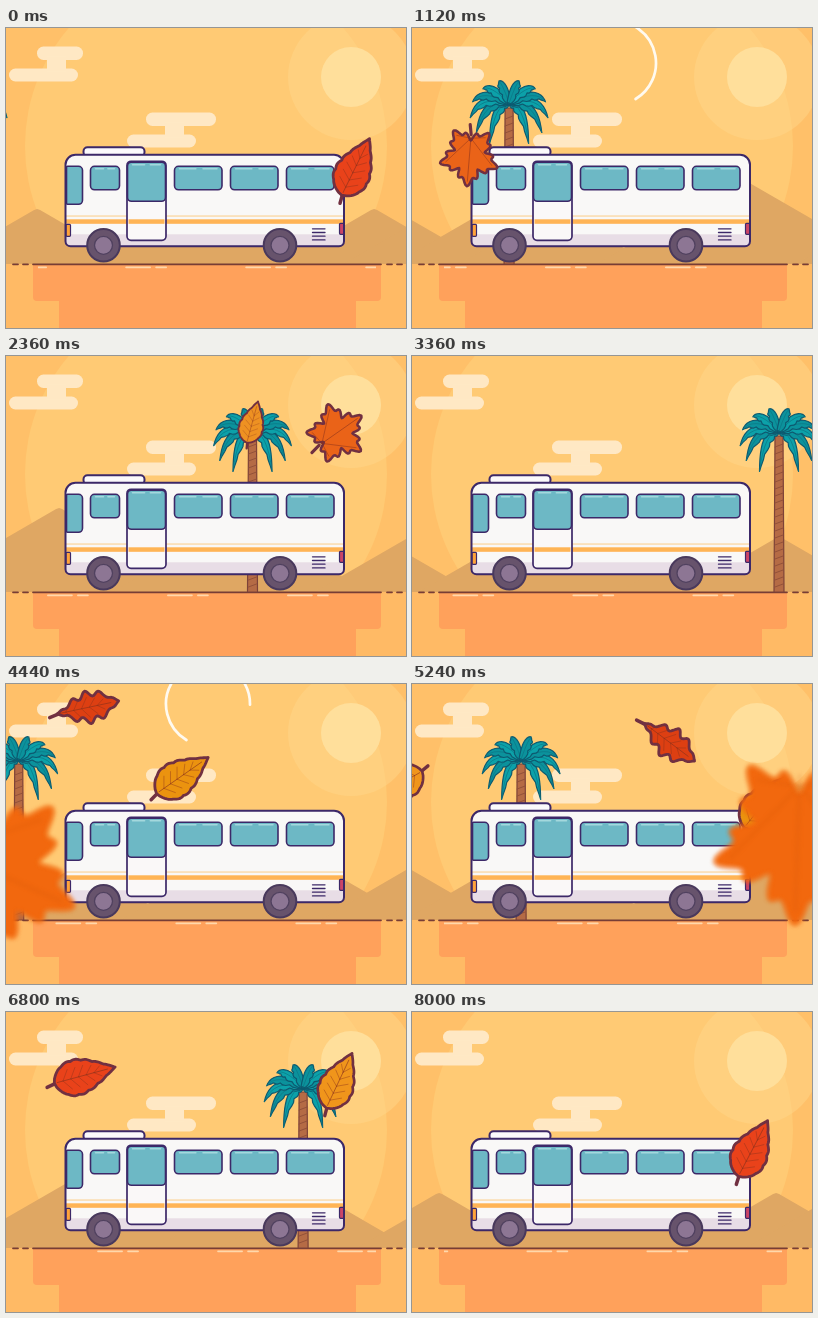
An HTML page with a canvas for the animation above (8.04 s loop, 400 px wide and 300 px high).

```html
<!DOCTYPE html>
<html lang="en">
<head>
<meta charset="utf-8">
<title>Autumn bus trip</title>
<style>
html, body { margin: 0; width: 100%; height: 100%; overflow: hidden; background: #ffc069; }
canvas { display: block; width: 400px; height: 300px; }
</style>
</head>
<body>
<canvas id="stage" width="400" height="300"></canvas>
<script>
const c = document.getElementById('stage').getContext('2d');
const LOOP = 8040, LAP = LOOP / 2, INK = '#3c2868', GLASS = '#6db8c5';
const { PI, sin, cos, abs, min, max } = Math;
const rad = a => a * PI / 180;
const mix = (a, b, p) => a + (b - a) * p;
const range = (n, fn) => Array.from({ length: n }, (_, i) => fn(i));
// Time passed since a moment, wrapped around the loop
const since = (t, at) => (t - at + LOOP) % LOOP;

function paint(fill, stroke, width = 2) {
  if (fill) { c.fillStyle = fill; c.fill(); }
  if (stroke) { c.strokeStyle = stroke; c.lineWidth = width; c.stroke(); }
}
function disc(x, y, r, fill, stroke, width) {
  c.beginPath(); c.arc(x, y, r, 0, 7); paint(fill, stroke, width);
}
function box(x, y, w, h, r, fill, stroke, width) {
  c.beginPath(); c.roundRect(x, y, w, h, r); paint(fill, stroke, width);
}
function line(x1, y1, x2, y2, color, width) {
  c.beginPath(); c.moveTo(x1, y1); c.lineTo(x2, y2); paint(null, color, width);
}
function poly(points, fill, stroke, width) {
  c.beginPath(); points.forEach(p => c.lineTo(...p)); c.closePath();
  paint(fill, stroke, width);
}

function cloud(x, y, top, width) {
  const color = '#ffe8c4';
  box(x + top, y, width, 13.5, 6.5, color);
  box(x, y + 22, 69, 13, 6.5, color);
  box(x + 38, y + 10, 19, 15, 0, color);
}
function sky() {
  c.fillStyle = '#ffc069'; c.fillRect(0, 0, 400, 300);
  disc(200, 118, 181, '#ffca74');
  disc(345, 49, 63, 'rgba(255,216,140,.45)');
  disc(345, 49, 30, '#ffdf9b');
  cloud(3, 18.5, 28, 46);
  cloud(121, 84.5, 19, 70);
}

// A stroke that sweeps clockwise around a ring and is erased behind its head
function gust(t, at, y) {
  const head = since(t, at) - 100;
  const from = max(-100, head - 240), to = min(400, head);
  if (from >= to) return;
  c.beginPath(); c.arc(202, y, 42, rad(from), rad(to)); paint(null, '#fffaf0', 2.7);
}

function hill(x, h) {
  const w = h * 1.75;
  poly([[x - w, 236], [x - 3, 237 - h], [x, 236 - h], [x + 3, 237 - h], [x + w, 236]], '#dfa763');
}
function hills(t) {
  const lap = 402, shift = t % LAP / LAP * lap;
  for (let k = -2; k < 2; k++) {
    hill(31 + shift + k * lap, 55);
    hill(219 + shift + k * lap, 84);
    hill(368 + shift + k * lap, 55);
  }
}

function frond(angle, color) {
  const tx = 39 * cos(angle), ty = 34 * sin(angle) + 11;
  const cx = tx * .75, cy = ty * .35 - 14, side = tx < 0 ? -1 : 1;
  const edge = (i, reach) => {
    const u = i / 12, w = reach * sin(PI * (u * .8 + .2)) * side;
    const dx = mix(cx, tx - cx, u), dy = mix(cy, ty - cy, u), n = Math.hypot(dx, dy);
    return [2 * u * (1 - u) * cx + u * u * tx + dy / n * w,
            2 * u * (1 - u) * cy + u * u * ty - dx / n * w];
  };
  poly([...range(13, i => edge(i, 3.6)), ...range(13, i => edge(12 - i, i % 3 ? -5.2 : -3.6))],
    color, '#0d5a70', 1.2);
  c.beginPath(); c.moveTo(0, 0); c.quadraticCurveTo(cx, cy, tx, ty); paint(null, '#0c7685', .7);
}
function palm(t) {
  c.save();
  c.translate(-38 + t % LAP * .1205, 75);
  poly([[-4, 5], [4, 5], [5, 161], [-5, 161]], '#b56b45', '#7d4238', 1.2);
  for (let y = 16; y < 158; y += 7) line(-4, y, 4, y - 3, '#8f4f38', .9);
  // From the drooping fronds up to the crown
  for (let i = 0; i < 6; i++)
    for (const s of [-1, 1]) frond(rad(-90 + s * (150 - i * 27)), i % 2 ? '#0b929c' : '#0ca1a9');
  c.restore();
}

function ground(t) {
  c.fillStyle = '#ffba65'; c.fillRect(0, 236, 400, 64);
  box(27, 236, 348, 37, [0, 0, 4, 4], '#ffa15b');
  c.fillRect(53, 270, 297, 30);
  c.save();
  c.beginPath(); c.rect(32, 237, 338, 5); c.clip();
  for (let x = t * 120 / 1005 % 120 - 120; x < 400; x += 120) {
    line(x, 239.3, x + 24, 239.3, '#ffd8ab', 1.8);
    line(x + 30, 239.3, x + 40, 239.3, '#ffd8ab', 1.8);
  }
  c.restore();
  line(27, 236.3, 375, 236.3, '#773d35', 1.8);
  for (const x of [7, 17, 381, 391]) line(x, 236.3, x + 5, 236.3, '#773d35', 1.8);
}

function pane(x, y, w, h) {
  box(x, y, w, h, 4, GLASS, INK, 1.6);
  line(x + 5, y + 2.5, x + w * .45, y + 2.5, '#a4d8dd', 1.5);
  line(x + w * .6, y + 2.5, x + w - 5, y + 2.5, '#a4d8dd', 1.5);
}
function bus() {
  const hull = (fill, stroke) => box(60, 127.5, 278.5, 91.5, [10, 10, 5, 5], fill, stroke);
  c.save();
  c.translate(-.5, -.7);
  box(78, 120, 61, 9, 4, '#fbf9fb', INK);
  hull('#f9f8f7');
  c.save(); c.clip();
  c.fillStyle = '#e8dde6'; c.fillRect(60, 207, 280, 13);
  c.fillStyle = '#fbdcae'; c.fillRect(60, 188, 280, 1.5);
  c.fillStyle = '#ffb455'; c.fillRect(60, 192, 280, 4.5);
  c.restore();
  box(61, 139, 16, 38, [1, 4, 4, 1], GLASS, INK, 1.6);
  pane(85, 139, 29, 23.5);
  for (let i = 0; i < 3; i++) pane(169 + i * 56, 139, 47.5, 23.5);
  box(121.5, 134, 39, 79, 4, '#faf8f8', INK, 1.7);
  c.fillStyle = '#ffb455'; c.fillRect(123, 192, 36, 4.5);
  pane(122, 135, 38, 39);
  box(60.5, 197, 4.5, 12, 1, '#ffa33a', INK, 1.2);
  box(334, 196, 4.5, 11, 1, '#cb4467', INK, 1.2);
  for (let y = 201.5; y < 215; y += 3.7) line(307, y, 319.5, y, INK, 1.3);
  hull(null, INK);
  for (const x of [98, 274.5]) {
    disc(x, 218, 16.3, '#67536c', '#49395c');
    disc(x, 218, 9, '#8d7694', '#50415f', 1.3);
  }
  c.restore();
}

// A leaf that lies along x, its half width given by a function of its length
const blade = width => {
  const half = range(49, i => [mix(-27, 36, i / 48), width(i / 48)]);
  return [...half, ...half.map(([x, w]) => [x, -w]).reverse()];
};
const shapes = {
  ovate: blade(u => 17 * sin(PI * u ** .65) + 1.3 * abs(sin(u * PI * 6)) * sin(PI * u)),
  oak: blade(u => 13.5 * sin(PI * u ** 1.15) + 3.2 * sin(u * PI * 9) * sin(PI * u)),
  maple: range(120, i => {
    const a = i / 60 * PI, r = 25.5 + 5 * cos(5 * a) + 3 * cos(15 * a);
    return [r * cos(a), r * sin(a)];
  })
};
const flight = (kind, color, at, y, angle, size = 1, time = 2160) =>
  ({ kind, color, at, y, angle, size, time });
// Heights and angles run from the left side of the stage to the right
const leaves = [
  flight('ovate', '#e9421a', 6291, [32, 169], [5, -80]),
  flight('maple', '#ea6318', 688, [146, 57], [140, -86], .9),
  flight('ovate', '#ee9122', 1074, [75, 65], [-45, -95], .68),
  flight('ovate', '#eb930f', 3485, [60, 137], [-15, -60]),
  flight('oak', '#dd3f12', 3917, [4, 88], [-44, 88]),
  flight('ovate', '#f0951b', 5125, [102, 64], [140, 340], .96),
  flight('maple', '#f2680e', 4162, [200, 140], [0, 120], 2.6, 1410),
  flight('maple', '#f2680e', 5810, [250, 225], [150, 270], 2.6, 1000)
];
function leaf(t, { kind, color, at, y, angle, size, time }) {
  const p = since(t, at) / time;
  if (p > 1) return;
  const near = size > 2, margin = near ? 150 : 38;
  const edge = near ? color : '#713041', vein = near ? '#cf5508' : '#8a321c';
  c.save();
  if (near) c.filter = 'blur(2px)';
  c.translate(mix(-margin, 400 + margin, p), mix(...y, p));
  c.rotate(rad(mix(...angle, p)));
  c.scale(size, size);
  if (!near) line(-35, 2, -24, 0, edge, 3.5);
  poly(shapes[kind], color, edge, near ? .5 : 2.8);
  c.globalAlpha = near ? .3 : .65;
  line(-24, 0, 28, 0, vein, .9);
  for (const s of [-1, 1]) {
    if (kind === 'maple')
      for (const a of [72, 144]) line(-20, 0, 27 * cos(rad(a)), 27 * s * sin(rad(a)), vein, .8);
    else
      for (let x = -18; x < 20; x += 8) line(x, 0, x + 7, s * (10 - max(0, x) * .35), vein, .6);
  }
  c.restore();
}

function draw(now) {
  const t = max(0, now) % LOOP;
  sky();
  gust(t, 962, 35);
  gust(t, 3980, 20);
  hills(t);
  ground(t);
  palm(t);
  bus();
  leaves.forEach(l => leaf(t, l));
  requestAnimationFrame(draw);
}
c.lineJoin = c.lineCap = 'round';
requestAnimationFrame(draw);
</script>
</body>
</html>
```
